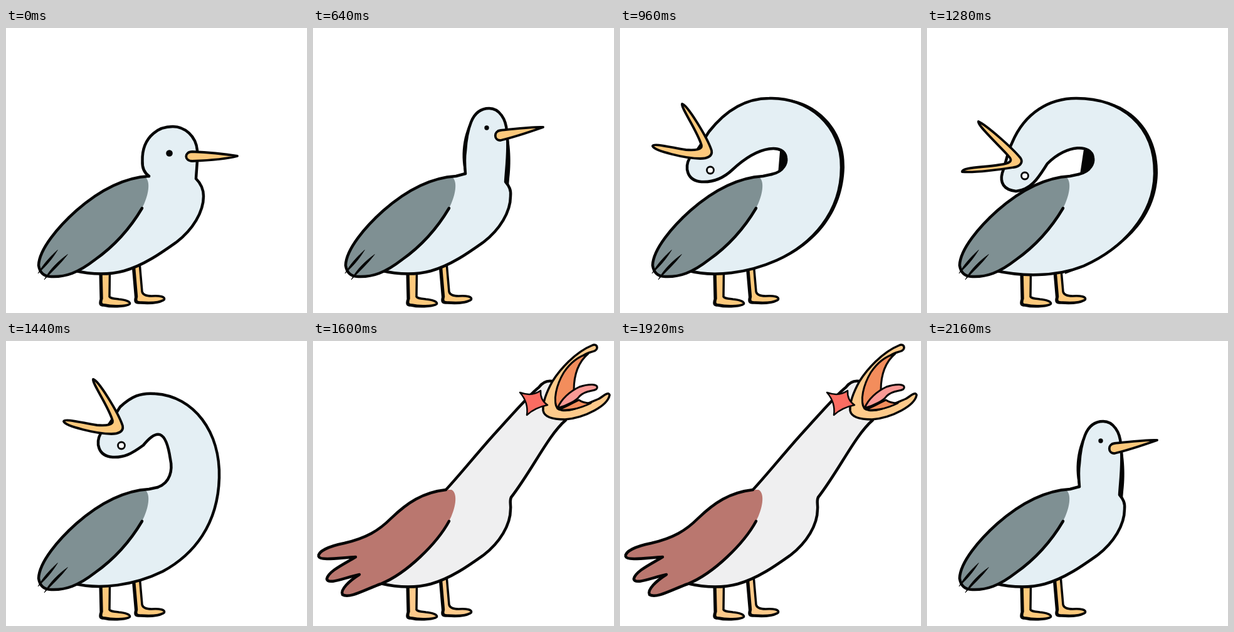
An HTML page with a canvas that plays this animation: 480x454 px, repeating every 2240 ms.

```html
<!DOCTYPE html>
<html lang="en">
<head>
<meta charset="utf-8">
<title>Gull</title>
<style>
html, body { margin: 0; width: 100%; height: 100%; overflow: hidden; background: #fff; }
canvas { display: block; }
</style>
</head>
<body>
<canvas id="stage" width="480" height="454"></canvas>
<script>
const ctx = document.getElementById('stage').getContext('2d');
const LOOP = 2240, STEP = 80;
const INK = '#050505';
const CALM = { body: '#e4eff4', wing: '#7f9093', beak: '#fdc97c' };
const ANGRY = { body: '#efeff0', wing: '#ba776f', beak: '#fdca8b' };

// Blend two paths that share the same commands
function mix(a, b, k) {
  const to = b.match(/-?[\d.]+/g);
  let i = 0;
  return a.replace(/-?[\d.]+/g, n => (+n + (to[i++] - n) * k).toFixed(2));
}
const lerp = (a, b, k) => a.map((v, i) => v + (b[i] - v) * k);

function shift(path, dx, dy) {
  let i = 0;
  return path.replace(/-?[\d.]+/g, n => +n + (i++ % 2 ? dy : dx));
}

function paint(path, fill, width = 4.5) {
  const p = new Path2D(path);
  if (fill) { ctx.fillStyle = fill; ctx.fill(p); }
  if (width) { ctx.lineWidth = width; ctx.strokeStyle = INK; ctx.stroke(p); }
}

function dot([x, y, r], fill, width) {
  ctx.beginPath();
  ctx.arc(x, y, r, 0, Math.PI * 2);
  ctx.fillStyle = fill;
  ctx.fill();
  if (width) { ctx.lineWidth = width; ctx.strokeStyle = INK; ctx.stroke(); }
}

const BELLY = ' C315 293 298 321 272 341 C248 358 220 378 188 387 C158 395 128 391 107 386';
const WING_EDGE = ' C192 238 152 256 112 291 C84 316 53 352 52 378 C54 391 62 396 72 396 C95 397 115 390 142 369 C176 345 201 314 217 287';
const SPREAD_EDGE = 'M212 237 C175 241 150 258 125 282 C105 302 85 314 50 322 C25 327 8 335 9 343 C11 351 45 345 68 344 C50 355 24 367 22 379 C24 389 50 377 74 372 C58 382 43 396 47 404 C58 411 85 395 108 387 C150 370 198 322 217 287';
const WING_END = ' C227 268 232 243 221 237 Z';
const LEFT_LEG = 'M152 390 L153 431 C150 440 153 441 158 441 C170 444 190 443 197 440 C200 436 190 433 180 432 C172 431 167 431 165 428 L165.5 390';
const RIGHT_LEG = 'M204 376 L208.5 428 C206 437 210 437 216 437 C230 438 245 437 252 433 C255 428 245 426 232 427 C222 427 218 424 217 420 L213 374';

const rest = {
  body: 'M228 236 C221 231 217 222 217.5 212 C217 195 221 180 235 168 C245 159 255 157 266 157 C285 157 303 172 305 195 C306 208 304 222 303 240 C310 247 315 256 315 268' + BELLY,
  beak: 'M297 197 C320 198 350 201 369 204 C350 209 320 211 297 212 C284 212 284 197 297 197 Z',
  eye: [260.5, 199.5, 5.3]
};
const alert = {
  body: 'M243 232 C242 220 241 208 243 196 C244 180 246 165 252 150 C258 135 268 128 281 128 C297 128 308 145 309 165 C313 190 308 225 307 245 C313 252 316 258 315 268' + BELLY,
  beak: 'M299 163 C320 161 350 157 367 158 C350 164 320 174 299 179 C288 179 288 164 299 163 Z',
  eye: [277, 159, 3.7],
  shade: 'M242 231 C234 200 240 160 260 136 Z M308 160 C317 190 315 225 313 240 L312 252 L304 246 Z'
};
const tall = {
  body: 'M243 232 C243 200 246 170 248 145 C249 120 250 98 254 81 C258 62 268 53 281 53 C297 53 308 70 309 90 C312 130 310 200 307 245 C313 252 316 258 315 268' + BELLY,
  beak: shift(alert.beak, 0, -75),
  eye: [277, 84, 3.7]
};
const rising = {
  body: mix(alert.body, tall.body, .5),
  beak: mix(alert.beak, tall.beak, .5),
  eye: lerp(alert.eye, tall.eye, .5)
};
const curl = {
  body: 'M242 233 C262 229 266 214 265 207 C263 185 224 184 179 226 C164 240 148 246 130 245 C106 243 103 222 111 207 C122 200 132 180 142 165 C168 132 200 112 238 112 C300 110 354 155 353 222 C353 295 305 345 250 370 C205 390 150 398 107 386',
  beak: 'M99 121 C107 122 139 174 146 195 C148 205 138 208 128 208 C105 208 55 196 52 188 C53 183 80 190 105 194 C120 195 131 194 130 187 C124 165 97 127 99 121 Z',
  eye: [144, 226.5, 5.5], open: true,
  shade: 'M262 113 C312 116 360 160 358 222 C356 295 310 350 240 376 Z'
};
const coil = {
  body: 'M242 233 C262 229 266 214 265 207 C263 185 224 184 192 216 C180 234 168 258 142 260 C122 258 116 246 120 231 C126 215 128 198 136 182 C156 135 195 112 238 112 C310 112 364 155 363 232 C362 300 310 352 250 379 C205 397 150 396 107 386',
  beak: 'M82 149 C95 155 135 190 149 207 C154 214 148 221 138 222 C120 225 75 231 56 229 C55 222 90 222 115 218 C132 216 138 212 130 204 C118 190 80 155 82 149 Z',
  eye: [156, 235.5, 5.5], open: true,
  shade: 'M262 114 C320 116 369 160 368 232 C366 305 312 358 220 392 Z'
};
const arch = {
  body: 'M242 233 C262 226 266 205 262 188 C255 140 240 140 219 166 C200 180 188 186 170 185 C146 183 143 162 151 147 C162 140 172 120 182 105 C200 88 215 82 238 84 C300 88 342 145 340 218 C338 292 300 340 250 367 C205 389 150 397 107 386',
  beak: shift(curl.beak, 40, -60),
  eye: [184, 166.5, 5.5], open: true
};

// A bent-neck pose between two others, or past the second
const blend = (a, b, k) => ({
  body: mix(a.body, b.body, k),
  beak: mix(a.beak, b.beak, k),
  eye: lerp(a.eye, b.eye, k),
  open: true,
  shade: a.shade && mix(a.shade, b.shade, k)
});

const SCREAM = 'M212 237 C235 212 260 181 285 153 C310 126 345 85 360 74 C366 66 374 63 381 64 C390 80 400 110 403 126 C375 150 350 205 316 249 C313 256 316 262 315 268' + BELLY;
const TONGUE_OUT = 'M390 107 C396 92 410 80 425 73 C440 68 455 68 453 75 C451 81 435 77 425 88 C420 95 405 103 390 107 Z';
const TONGUE_UP = 'M390 107 C398 90 415 76 424 62 C430 53 440 54 440 62 C438 75 430 85 423 94 C412 104 400 109 390 107 Z';
const scream = (wag, spread = 1) => ({ body: SCREAM, tongue: mix(TONGUE_OUT, TONGUE_UP, wag), spread });

const timeline = [
  [0, rest], [640, alert], [720, tall], [800, arch], [880, blend(arch, curl, .75)], [960, curl],
  [1280, coil], [1360, blend(curl, coil, 1.2)], [1440, arch], [1520, scream(.5, 1.024)],
  [1600, scream(0)], [1680, scream(.5)], [1760, scream(1)], [1840, scream(.5)],
  [1920, scream(0)], [2000, scream(.5)], [2080, rising], [2160, alert]
];

function leg(path, color) {
  paint(shift(path, -1.8, 1), INK, 3.5);
  paint(path, color, 3.5);
}

function foldedWing(pose, color) {
  const start = pose.body.match(/^M[\d.]+ [\d.]+/)[0];
  const edge = start + ' L228 236' + WING_EDGE;
  paint('M228 236' + WING_EDGE + WING_END, color, 0);
  paint(edge);
  paint('M82 354 C73 362 60 375 51 391 C63 380 73 369 82 354 Z M98 361 C85 370 70 384 61 401 C73 388 87 376 98 361 Z', INK, .8);
}

function spreadWing(scale, color) {
  ctx.save();
  ctx.translate(217, 260);
  ctx.scale(scale, scale);
  ctx.translate(-217, -260);
  paint(SPREAD_EDGE + WING_END, color, 0);
  paint(SPREAD_EDGE);
  ctx.restore();
}

function screamFace(tongue, color) {
  paint('M445 7 C418 18 394 45 382 64 C372 82 366 98 367 111 C369 122 385 125 402 125 C435 122 470 103 473 86 C471 80 463 88 456 92 C444 97 430 104 417 108 C400 113 387 111 387 98 C388 70 405 38 433 22 C442 16 452 18 453 11 C453 6 449 5 445 7 Z', color, 3.5);
  paint('M439 20 C425 32 416 50 416 78 C405 88 395 98 390 108 C382 95 388 70 400 50 C412 32 425 24 439 20 Z', '#f38d5c', 3);
  paint('M392 109 C405 105 420 95 424 94 C430 98 437 99 443 99 C425 108 405 112 392 109 Z', '#f38d5c', 3);
  paint(tongue, '#fa9a96', 3);
  paint('M330 82 Q349 89 363 79 Q362 94 374 102 Q354 106 341 118 Q344 98 330 82 Z', '#fb6c62', 2.5);
}

function draw(pose) {
  const c = pose.tongue ? ANGRY : CALM;
  ctx.fillStyle = '#fff';
  ctx.fillRect(0, 0, 480, 454);
  ctx.lineJoin = ctx.lineCap = 'round';
  leg(LEFT_LEG, c.beak);
  leg(RIGHT_LEG, c.beak);
  if (pose.shade) paint(pose.shade, INK, 0);
  paint(pose.body + ' L222 239 Z', c.body, 0);
  paint(pose.body);
  if (pose.tongue) {
    spreadWing(pose.spread, c.wing);
    screamFace(pose.tongue, c.beak);
  } else {
    foldedWing(pose, c.wing);
    paint(pose.beak, c.beak, 3.8);
    if (pose.open) dot(pose.eye, '#fff', 2.8);
    else dot(pose.eye, INK);
  }
}

function tick(now) {
  const t = Math.floor((now % LOOP) / STEP) * STEP;
  draw(timeline.filter(([at]) => at <= t).pop()[1]);
  requestAnimationFrame(tick);
}
tick(0);
</script>
</body>
</html>
```
